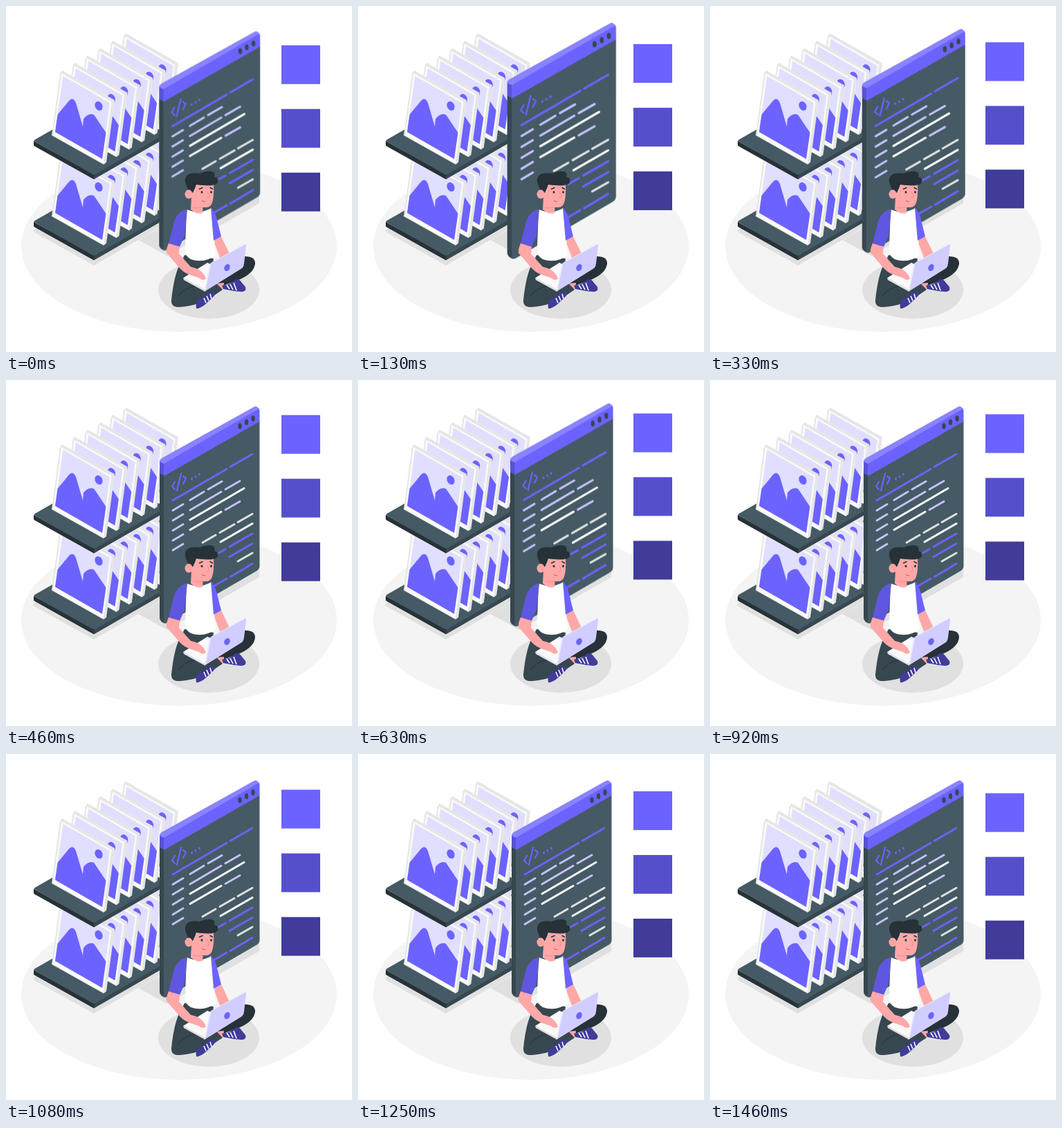
An HTML page without scripts for the animation above (1.5 s loop, 500x500 px).

```html
<!DOCTYPE html>
<html lang="en">
<head>
<meta charset="utf-8">
<title>Developer at work</title>
<style>
  html, body { margin: 0; width: 100%; height: 100%; overflow: hidden; background: #fff; }
  svg { display: block; width: 100%; height: 100%; }
  .window { transform-origin: 294.4px 195.5px; animation: heartbeat 1.5s linear -15ms infinite; }
  .badges { animation: float 1.5s linear -15ms infinite; }
  .code { fill: none; stroke-width: 3; stroke-linecap: round; stroke-linejoin: round; }
  .purple { stroke: #6c63ff; }
  .lilac { stroke: #c4c1ff; }
  .white { stroke: #fff; }
  .grey { stroke: #e0e0e0; }
  .skin { fill: #ffa8a7; }
  .dark { fill: #263238; }
  @keyframes heartbeat {
    0%, 30%, 40%, 60%, 100% { transform: scale(1); }
    10%, 50% { transform: scale(1.09); }
  }
  @keyframes float {
    50% { transform: translateY(-10px); }
  }
</style>
</head>
<body>
<svg viewBox="0 0 500 500">
  <defs>
    <g id="picture">
      <path fill="#e6e6e6" d="M78 97 81 93 157 136 145 226 141 229 66 187Z"/>
      <path fill="#fafafa" d="M80 97 152.500 138.500 141 228 68 186.500Z"/>
      <path fill="#e1dfff" d="M82.500 101 150 140 139 221 71 182Z"/>
      <path fill="#6c63ff" d="M71 182 74.500 157 91 137Q97 131 101 140L111 174 112 163Q119 154 127 157L144.500 183 139 221Z"/>
      <ellipse cx="134" cy="144.500" rx="5.300" ry="7" fill="#6c63ff" transform="rotate(-25 134 144.500)"/>
    </g>
    <g id="row">
      <use href="#picture" x="92" y="-53.500"/>
      <use href="#picture" x="73.600" y="-42.800"/>
      <use href="#picture" x="55.200" y="-32.100"/>
      <use href="#picture" x="36.800" y="-21.400"/>
      <use href="#picture" x="18.400" y="-10.700"/>
      <use href="#picture"/>
    </g>
    <g id="shelf">
      <path class="dark" d="M40 195V201Q40 202 42 203L127 250.500V243Z"/>
      <path fill="#37474f" d="M127 243 232 183V190L127 250.500Z"/>
      <path fill="#455a64" d="M42 193 140 137 232 184 129 243Q127 244 125 243L42 196Q39 194.500 42 193Z"/>
    </g>
  </defs>

  <ellipse cx="250" cy="347" rx="228" ry="124" fill="#f4f4f4"/>
  <g fill="#e0e0e0">
    <path d="M39 324 60 311 222 305V320L127 375 41 327Z"/>
    <path d="M191 338 222 321 366 270V285L233 361Z"/>
    <ellipse cx="293" cy="410" rx="73" ry="42"/>
  </g>

  <use href="#shelf" y="117"/>
  <use href="#row" y="117"/>
  <use href="#shelf"/>
  <use href="#row"/>

  <g class="window">
    <path fill="#37474f" d="M222 134 230 130V352Q222 349 222 344Z"/>
    <path fill="#455a64" d="M228 138 366.500 59V269Q366.500 273 362 276L233 351Q228 353 228 348Z"/>
    <path fill="#5a52d5" d="M222 116 229 120V138.500L222 135Z"/>
    <path fill="#8983ff" d="M222 118Q222 115 225 113L359 38.500Q361 37.500 363 39L366.500 42 228 121Z"/>
    <path fill="#6c63ff" d="M228 124Q228 121 231 119L363 43Q366.500 41 366.500 44V60L228 139Z"/>
    <g fill="#37474f">
      <ellipse cx="338" cy="66.500" rx="2.700" ry="4.200"/>
      <ellipse cx="347.500" cy="61" rx="2.700" ry="4.200"/>
      <ellipse cx="357" cy="55.500" rx="2.700" ry="4.200"/>
    </g>
    <g class="code">
      <path class="purple" stroke-width="2.200" d="M244 147 240 154 244 158M253 135 247 160M256 139 260 142 256 150"/>
      <path class="purple" d="M268.500 143v-.5M274 140v-.5M279.500 136.500v-.5"/>
      <path class="purple" d="M241 174 319 128.500M324 125.500 356 107M303 252.500 317 244.500M323 241 356 222M323 255.500 356 236.500M300 298 319 287M324 284.500 356 265.500"/>
      <path class="lilac" d="M241 188.500 256 179.500M266 173.500 286 161.500M292 158 312 146.500M241 203 256 194M266 188 311 161.500M317 158 338 146M241 217.500 256 208.500M317 187.500 338 175.500M241 232 256 223M241 246 256 237"/>
      <path class="white" d="M266 202 344 156.500M266 216.500 311 190.500M310 234 356 207.500"/>
      <path class="grey" d="M284 235 303 224M309 220.500 330 208.500M335 205.500 356 193.500M335 262 356 250"/>
    </g>
  </g>

  <g class="badges">
    <rect x="398" y="57" width="56" height="56" fill="#6c63ff"/>
    <rect x="398" y="149" width="56" height="56" fill="#564fcc"/>
    <rect x="398" y="241" width="56" height="56" fill="#413b99"/>
  </g>

  <g>
    <!-- legs and shoes -->
    <path class="dark" d="M303 368 340 362Q360 360 360 372Q359 386 336 396L314 404 280 400Z"/>
    <path class="skin" d="M304 401 315 400 314 409 306 410Z"/>
    <path fill="#37474f" d="M253 370Q243 386 239 425Q238 436 252 435Q269 434 289 426L313 410 296 392 300 365 258 360Z"/>
    <path fill="none" stroke="#263238" d="M248 420Q258 407 273 405"/>
    <g fill="#413b99">
      <path d="M275 437Q273 429 279 424L296 413 304 415 298 422 287 432Q279 438 275 437Z"/>
      <path d="M312 404 322 402 333 395Q337 394 341 400L346 406Q348 412 341 413Q328 412 314 409Z"/>
    </g>
    <path fill="none" stroke="#fff" stroke-width="1.600" d="M286 422 289 429M290 419 293 426M295 416 297 423M319 403 323 409M324 402 328 410M329 400 333 411"/>

    <!-- body -->
    <path class="skin" d="M299 337 311 333 323 358 310 366Z"/>
    <path fill="#fff" d="M261 294Q279 302 297 292L302 330Q300 347 304 359Q287 373 267 366Q258 362 259 348Z"/>
    <path fill="#6c63ff" d="M296 292Q303 298 305 309L311 333 300 339Z"/>
    <path fill="#5f57e0" d="M262 294Q247 296 242 315L235 343 251 348 258 332Z"/>

    <!-- laptop -->
    <path fill="#fafafa" d="M256 393 291 371 302 376 288 412Z"/>
    <path fill="#e0e0e0" d="M256 393 288 410V413L257 396Z"/>
    <path class="skin" d="M235 343 251 348 250 358 267 377Q284 380 289 394Q284 398 279 393L267 389Q258 386 252 380L232 357Q231 352 235 343Z"/>
    <path fill="#d1ceff" d="M296 373Q296 371 299 370L345 344.500Q347 343 347 347L344 372Q344 376 341 379L288 412Z"/>
    <path fill="none" stroke="#e8e7ff" d="M288 411 294 375Q295 371 299 370L346 344"/>
    <ellipse cx="319.500" cy="378" rx="4" ry="5.300" fill="#6c63ff" transform="rotate(25 319.500 378)"/>

    <!-- head -->
    <path class="skin" d="M268 276 285 284 284 299Q276 302 267 294Z"/>
    <path class="skin" d="M267 260Q270 252 300 257Q301 275 298 284Q296 292 286 291Q272 291 268 280Z"/>
    <path class="dark" d="M265 268Q256 254 260 247Q264 240 280 242Q294 236 301 241Q302 244 301 247Q308 248 306 255Q302 262 275 258Q273 264 270 270Z"/>
    <ellipse class="skin" cx="264" cy="272" rx="5.500" ry="6.500"/>
    <path fill="none" stroke="#f28f8f" d="M261 270Q265 270 266 275M291 268 294 276 290 277M270 291Q276 293 284 291"/>
    <g class="dark">
      <ellipse cx="283" cy="269" rx="1.500" ry="1.800"/>
      <ellipse cx="296.500" cy="269" rx="1.500" ry="1.800"/>
    </g>
    <path fill="none" stroke="#263238" stroke-width="1.500" stroke-linecap="round" d="M279.500 264.500 284 262.500M295 262.500 298.500 264.500"/>
    <path fill="none" stroke="#b55b63" stroke-linecap="round" d="M283 281Q285 283.500 288 282.500"/>
  </g>
</svg>
</body>
</html>
```
